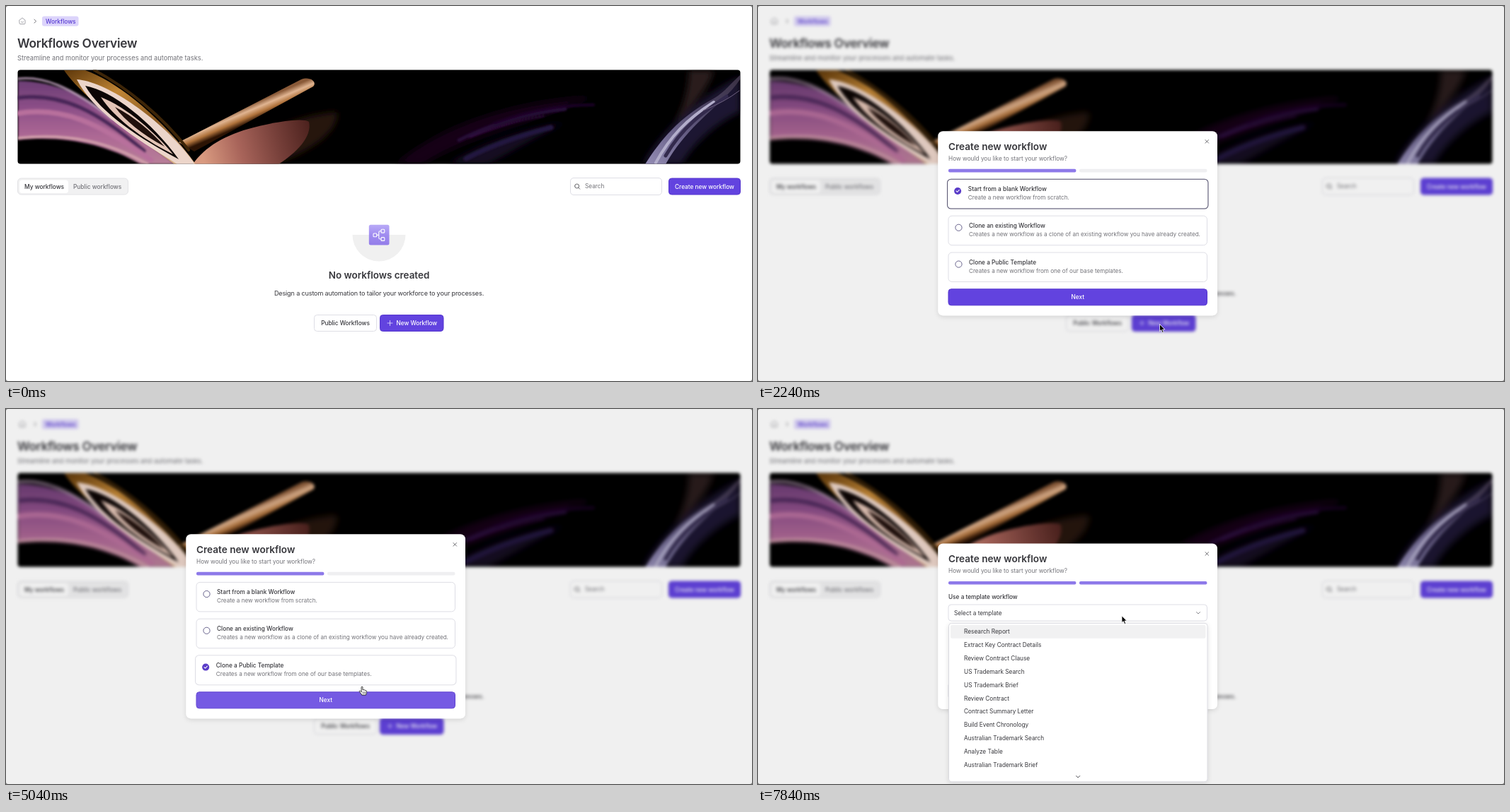
Write an HTML page that moves like this. It is 1054 px wide and 531 px high and loops after 8 s.

```html
<!DOCTYPE html>
<html lang="en">
<head>
<meta charset="utf-8">
<title>Workflows</title>
<style>
  html, body { margin: 0; width: 100%; height: 100%; overflow: hidden; background: #fff; }
  svg { display: block; width: 100vw; height: 100vh; font-family: Inter, "Open Sans", sans-serif; }
  text { white-space: pre; }
</style>
</head>
<body>
<svg id="stage" viewBox="0 0 1054 531"></svg>
<script>
const LOOP = 8000, STEP = 70;
const PURPLE = '#6243df', EDGE = '#5637cf', INK = '#37373c', GREY = '#727278', LINE = '#dedee5';

// Drawing helpers: text is placed by the middle of its capitals.
const text = (x, mid, str, { size = 8.27, weight = 400, fill = INK, anchor = 'start', gap = 0 } = {}) =>
  `<text x="${x}" y="${mid + size * 0.36}" font-size="${size}" font-weight="${weight}" fill="${fill}"
    text-anchor="${anchor}" letter-spacing="${gap}">${str}</text>`;
const box = (x, y, w, h, r, fill = '#fff', stroke = 'none', extra = '') =>
  `<rect x="${x}" y="${y}" width="${w}" height="${h}" rx="${r}" fill="${fill}" stroke="${stroke}" ${extra}/>`;
const path = (d, fill = 'none', stroke = 'none', width = 1, extra = '') =>
  `<path d="${d}" fill="${fill}" stroke="${stroke}" stroke-width="${width}" stroke-linecap="round" stroke-linejoin="round" ${extra}/>`;
const strand = (d, color, width) => path(d, 'none', color, width);
const group = (content, extra = '') => `<g ${extra}>${content}</g>`;
const gradient = (id, dir, ...stops) =>
  `<linearGradient id="${id}" ${dir}>${stops.map((c, i) =>
    `<stop offset="${i / (stops.length - 1)}" stop-color="${c}"/>`).join('')}</linearGradient>`;
const scaleAbout = (x, y, s) => `transform="translate(${x} ${y}) scale(${s}) translate(${-x} ${-y})"`;

const primaryButton = (x, y, w, label, hover = 0, labelX = x + w / 2, id = '') =>
  box(x, y, w, 23, 4, PURPLE, EDGE) + box(x, y, w, 23, 4, '#fff', 'none', `${id} opacity="${0.12 * hover}"`) +
  text(labelX, y + 11.7, label, { weight: 500, fill: '#fff', anchor: 'middle' });
const plainButton = (x, y, w, label) =>
  box(x, y, w, 23, 4, '#fff', LINE) + text(x + w / 2, y + 11.5, label, { weight: 500, anchor: 'middle' });

// Time helpers
const clamp = v => Math.min(1, Math.max(0, v));
const ramp = (t, from, length) => clamp((t - from) / length);
const pulse = (t, from, to, length = 140) => ramp(t, from, length) - ramp(t, to, length);
const ease = p => p * p * (3 - 2 * p);

function banner() {
  const glow =
    path('M300 224C340 190 400 155 468 150C470 180 430 205 380 224Z', '#25120c') +
    path('M550 224C620 165 720 135 830 128C760 160 650 185 590 224Z', '#120419') +
    path('M625 224C670 195 730 175 790 165C730 195 700 215 680 224Z', '#130a24') +
    path('M965 91H1000C995 110 975 140 945 165C960 140 965 110 965 91Z', '#2a1b1c') +
    path('M900 224C925 180 970 135 1037 100V150C1005 165 970 195 955 224Z', '#1d1430');
  const streaks =
    strand('M640 190Q710 155 790 146', '#270a38', 5) +
    strand('M655 186Q710 164 760 156', '#3b1050', 1.5) +
    strand('M650 216Q700 190 770 172', '#21123f', 7) +
    strand('M690 166Q760 140 830 140', '#1a0626', 4);
  const ribbons =
    path('M17 106C70 106 120 130 160 165C200 195 225 212 240 224H190C140 195 80 183 17 190Z', 'url(#mauve)') +
    strand('M17 103C50 99 90 112 150 160', '#bfa0bd', 2.5) +
    strand('M17 130C80 122 130 150 195 205', '#4a2659', 6) +
    strand('M17 152C80 142 130 165 205 218', '#b8709c', 7) +
    strand('M17 187C90 180 145 192 200 224', '#d7a5ae', 3);
  const loops =
    strand('M125 91C170 115 220 155 258 204', '#3d2508', 4) +
    path('M82 91H112C155 106 218 155 268 224H238C190 190 108 130 82 91Z', 'url(#gold)') +
    path('M100 104C140 106 222 160 267 224H242C180 186 122 148 100 104Z', '#ecd5ca') +
    path('M112 113C150 120 205 163 244 217C190 188 134 152 112 113Z', '#0c0504') +
    path('M134 129C170 143 212 180 236 210C190 187 152 157 134 129Z', '#e3c4b6') +
    path('M154 143C180 156 206 178 224 199C192 182 168 162 154 143Z', '#20100c');
  const silk =
    path('M903 224C925 190 950 158 1000 131C1015 122 1026 108 1037 98V104C1015 138 965 165 932 224Z', 'url(#silk)') +
    strand('M918 222C938 185 962 160 1000 136', '#b3aecb', 4) +
    strand('M932 212C955 172 985 150 1018 128', '#332a4d', 5) +
    strand('M985 148Q1015 136 1036 120', '#6f6280', 1);
  return group(box(16, 90, 1022, 134, 0, '#000') +
    group(glow, 'filter="url(#haze)"') + group(streaks, 'filter="url(#mist)"') +
    group(
      path('M264 224C280 200 310 182 350 172C390 162 420 159 428 164C433 185 410 208 385 224Z', 'url(#blush)') +
      path('M244 193L417 104C430 99 440 108 434 114L266 206Z', 'url(#tube)'), 'filter="url(#soft)"') +
    group(ribbons, 'filter="url(#mist)"') + group(loops + silk, 'filter="url(#soft)"'),
    'clip-path="url(#bannerClip)"');
}

function page() {
  const pill = { weight: 500, size: 8.35 };
  return path('M19 20L23 16.8L27 20V24.5Q27 25.5 26 25.5H20Q19 25.5 19 24.5ZM21.3 22.5Q23 24.3 24.7 22.5', 'none', '#8f8f96', 0.8) +
    path('M40 19L42.5 21.5L40 24', 'none', '#66666c', 0.9) +
    box(51, 14.5, 51.5, 14, 3, '#dcd4fb') + text(56, 21.5, 'Workflows', { ...pill, fill: '#583cd2' }) +
    text(16, 53, 'Workflows Overview', { size: 17.3, weight: 600, gap: -0.25 }) +
    text(16, 73.5, 'Streamline and monitor your processes and automate tasks.', { size: 9.28, fill: GREY }) +
    banner() +
    box(16.5, 244, 156, 23, 5, '#f1f1f2', '#e3e3e6') + box(19, 246.5, 69, 18.5, 4) +
    text(26, 255.5, 'My workflows', pill) + text(95, 255.5, 'Public workflows', { ...pill, fill: GREY }) +
    box(797.5, 243.5, 129, 24, 4.5, '#fff', LINE) +
    path('M803.6 255a3 3 0 1 0 6 0a3 3 0 1 0 -6 0M808.8 257.2L810.8 259.2', 'none', '#55555b', 0.9) +
    text(818, 255.5, 'Search', { fill: GREY }) +
    primaryButton(936.5, 244, 101, 'Create new workflow') +
    path('M489.5 324H564.5A37.5 37.5 0 0 1 489.5 324Z', '#f0f0f0') +
    box(512.8, 309.8, 28.7, 28.7, 2.5, 'url(#tile)') +
    group(box(519, 322, 4.8, 4.8, 1, 'none', '#fff') + box(530, 316.3, 4.8, 4.8, 1, 'none', '#fff') +
      box(530, 327.6, 4.8, 4.8, 1, 'none', '#fff') +
      path('M524 324.4H526.8M530 318.7H528.5Q526.8 318.7 526.8 320.5V328.2Q526.8 330 528.5 330H530', 'none', '#fff', 1.1), 'stroke-width="1.1"') +
    text(527, 381, 'No workflows created', { size: 13.45, weight: 600, anchor: 'middle' }) +
    text(527, 407, 'Design a custom automation to tailor your workforce to your processes.',
      { size: 9.08, anchor: 'middle', gap: -0.15 }) +
    plainButton(435.5, 437.5, 88, 'Public Workflows') +
    primaryButton(528.5, 437.5, 89.5, 'New Workflow', 0, 580.3, 'id="newHover"') +
    path('M539 449H546M542.5 445.5V452.5', 'none', '#e8e3ff', 0.8);
}

function dialogFrame(y, h, steps) {
  return box(254.3, y, 394.7, h, 7, '#fff', 'none', 'filter="url(#shadow)"') +
    path(`M632 ${y + 12.3}l4.6 4.6m0 -4.6l-4.6 4.6`, 'none', '#606066', 0.9) +
    text(269, y + 22, 'Create new workflow', { size: 13.6, weight: 600 }) +
    text(269, y + 38.7, 'How would you like to start your workflow?', { fill: GREY }) +
    [269, 454].map((x, i) => box(x, y + 53.6, 180.4, 4.6, 2, i < steps ? '#8d79e9' : '#efeff1')).join('');
}

function option(y, title, note, selected, dark) {
  const cy = y + 16.6;
  const radio = selected
    ? `<circle cx="283.5" cy="${cy}" r="5" fill="#5a3cc8"/>` + path(`M281.4 ${cy}l1.5 1.5l2.8 -3`, 'none', '#fff', 1)
    : `<circle cx="283.5" cy="${cy}" r="4.6" fill="#fff" stroke="#57527f" stroke-width=".9"/>`;
  return group(
    box(269, y, 365.5, 41.5, 5, '#fff', LINE) +
    box(269, y, 365.5, 41.5, 5, 'none', '#56536f', `opacity="${dark}"`) + radio +
    text(298, y + 13.9, title, { weight: 500 }) + text(298, y + 26, note, { size: 8.15, fill: GREY }),
    scaleAbout(451.75, y + 20.75, selected ? 1.008 : 1));
}

function chooseStep(t) {
  const chosen = t < 3150 ? 0 : t < 4550 ? 1 : 2;
  const dark = [1 - ramp(t, 3080, 280), pulse(t, 3010, 3500), pulse(t, 3500, 4830)];
  const options = [
    ['Start from a blank Workflow', 'Create a new workflow from scratch.'],
    ['Clone an existing Workflow', 'Creates a new workflow as a clone of an existing workflow you have already created.'],
    ['Clone a Public Template', 'Creates a new workflow from one of our base templates.']
  ];
  return dialogFrame(177.2, 261, 1) +
    options.map(([title, note], i) => option(245.4 + 51.8 * i, title, note, i === chosen, dark[i])).join('') +
    primaryButton(269, 400.8, 365.5, 'Next', pulse(t, 4900, 5390));
}

function templateStep(t) {
  return dialogFrame(190.4, 234.6, 2) +
    text(269, 266, 'Use a template workflow', { weight: 500 }) +
    box(269, 277, 365.5, 23, 4, '#fff', LINE) + text(277, 288.8, 'Select a template') +
    path('M619.5 287.5L622 290L624.5 287.5', 'none', '#77777d', 0.9) +
    plainButton(269, 387.5, 178, 'Back') +
    primaryButton(457, 387.5, 177.5, 'Start building', pulse(t, 5880, 6930)) +
    dropdown(ramp(t, 7560, 210));
}

const TEMPLATES = ['Research Report', 'Extract Key Contract Details', 'Review Contract Clause',
  'US Trademark Search', 'US Trademark Brief', 'Review Contract', 'Contract Summary Letter',
  'Build Event Chronology', 'Australian Trademark Search', 'Analyze Table', 'Australian Trademark Brief'];

function dropdown(open) {
  if (!open) return '';
  return group(
    box(269.5, 303.3, 365.5, 224.5, 4, '#fff', '#dadae0', 'filter="url(#shadow)"') +
    box(272, 306, 360.5, 18.8, 2, '#f1f1f2') +
    TEMPLATES.map((name, i) => text(291, 315.5 + 18.83 * i, name)).join('') +
    path('M449.7 519.5L452.2 522L454.7 519.5', 'none', '#4a4a50', 1),
    `opacity="${open}" ${scaleAbout(452, 303, 0.95 + 0.05 * open)}`);
}

// Pointer tip: [time, x, y]
const POINTER = [[0, 640, 545], [840, 569, 449], [1400, 569, 449], [1540, 567.5, 451], [2450, 567.5, 451],
  [3220, 501, 318], [4060, 503, 321], [4410, 505, 325], [4690, 505, 370], [4830, 505, 372], [5250, 501, 414.5],
  [5810, 501, 414.5], [6090, 543.5, 401.5], [6860, 543.5, 401.5], [6930, 529, 388], [7420, 514, 293], [LOOP, 514, 293]];

function pointer(t) {
  const i = POINTER.findIndex(k => k[0] > t);
  const [t0, x0, y0] = POINTER[i - 1], [t1, x1, y1] = POINTER[i];
  const p = ease((t - t0) / (t1 - t0));
  const x = x0 + (x1 - x0) * p, y = y0 + (y1 - y0) * p;
  const hand = (t >= 2590 && t < 5390) || (t >= 5950 && t < 7000);
  const shape = hand
    ? path('M-1 1Q-1 -.2 0 -.2T1 1V4.4Q2 3.7 2.9 4.7Q4 4.1 4.6 5.2Q6.4 4.9 6.4 6.6V8.5Q6.4 10 5.4 11.8H-.2Q-1.4 9.5 -3.6 7.2Q-4.2 6.2 -3.2 5.8Q-2.3 5.6 -1 7.2Z', '#fff', '#222', 0.9) +
      path('M1.2 7.4V9.8M2.9 7.4V9.8M4.5 7.4V9.8', 'none', '#222', 0.6)
    : path('M0 0V9.6L2.2 7.6L3.9 11.5L5.6 10.8L4 7H7Z', '#000', '#fff', 0.8);
  const radius = t >= 910 && t < 1190 ? 15 : t >= 6580 && t < 7560 ? 20.3 : 0;
  const ring = radius ? `<circle r="${radius}" fill="none" stroke="#111" stroke-width="1.3"/>` : '';
  return group(ring + shape, `transform="translate(${x} ${y})"`);
}

const stage = document.getElementById('stage');
stage.innerHTML = `<defs>
  ${gradient('tile', 'x2="0" y2="1"', '#b9aaf7', '#a08cf0', '#937de9')}
  ${gradient('tube', 'gradientUnits="userSpaceOnUse" x1="330" y1="146" x2="339" y2="167"', '#8a5a38', '#e0b491', '#b0733c', '#2c1304')}
  ${gradient('blush', 'x2="1" y2="-.1"', '#d99a80', '#a8645a', '#77403a', '#4a201c')}
  ${gradient('mauve', 'x2="0" y2="1"', '#6b3d74', '#8d4f88', '#ad6894', '#b87f98')}
  ${gradient('gold', 'x2=".8" y2="1"', '#5d370a', '#c08535', '#8a5a22', '#d8ae84')}
  ${gradient('silk', 'y1="1" x2="1" y2="0"', '#948db5', '#6a6289', '#4a4260', '#3a3043')}
  <clipPath id="bannerClip">${box(16.5, 90.5, 1021, 133, 4)}</clipPath>
  <filter id="haze"><feGaussianBlur stdDeviation="5"/></filter>
  <filter id="mist"><feGaussianBlur stdDeviation="1.6"/></filter>
  <filter id="soft"><feGaussianBlur stdDeviation=".7"/></filter>
  <filter id="shadow" x="-10%" y="-10%" width="120%" height="125%">
    <feDropShadow dx="0" dy="2" stdDeviation="3" flood-opacity=".12"/></filter>
  </defs>
  ${box(0, 0, 1054, 531, 0, '#777')}${box(0, 0, 1054, 531, 3)}
  <g id="page">${page()}</g>
  ${box(0, 0, 1054, 531, 3, '#000', 'none', 'id="shade"')}
  <g id="front"></g>`;
const [pageLayer, shade, front, newHover] =
  ['page', 'shade', 'front', 'newHover'].map(id => document.getElementById(id));

function draw(t) {
  const open = ramp(t, 2030, 210);
  pageLayer.style.filter = open ? `blur(${2.1 * open}px)` : 'none';
  shade.setAttribute('opacity', 0.06 * open);
  newHover.setAttribute('opacity', 0.11 * pulse(t, 1330, 2100));
  const dialog = open
    ? group(t < 5390 ? chooseStep(t) : templateStep(t), `opacity="${open}" ${scaleAbout(451.7, 307, 0.95 + 0.05 * open)}`)
    : '';
  front.innerHTML = dialog + pointer(t);
}

const start = performance.now();
let shown = -1;
function tick() {
  const elapsed = Math.max(0, performance.now() - start) % LOOP;
  const t = Math.floor(elapsed / STEP) * STEP;
  if (t !== shown) draw(shown = t);
  requestAnimationFrame(tick);
}
tick();
</script>
</body>
</html>
```
